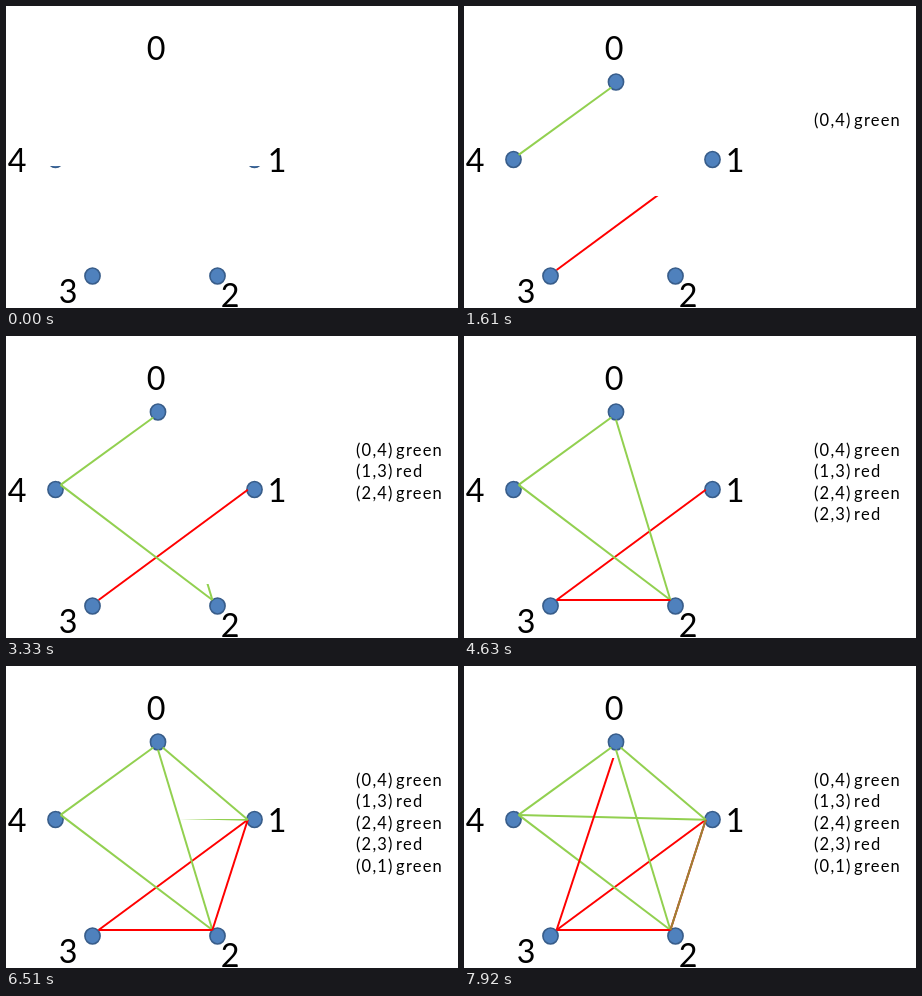
An HTML page for the animation above (8000 ms loop, 452 px wide and 302 px high).

```html
<!DOCTYPE html>
<html lang="en">
<head>
<meta charset="utf-8">
<title>Edge colouring of five points</title>
<style>
  html, body { margin: 0; width: 100%; height: 100%; overflow: hidden; background: #fff; }
  svg { position: absolute; left: 0; top: 0; width: 452px; height: 302px; }
  text { font-family: Lato, "Open Sans", sans-serif; fill: #000; }
  .label { font-size: 32.3px; text-anchor: middle; }
  .entry { font-size: 16.5px; letter-spacing: 1.2px; word-spacing: -3px; }
  line { stroke-width: 2; }
  ellipse { fill: #4f81bd; stroke: #385d8a; stroke-width: 1.6; }
</style>
</head>
<body>
<script>
const LOOP = 8000, HEIGHT = 302;
const FIRST = 213, GAP = 513.5;    // start of the first effect, time between effects
const WIPE = 540, STEPS = 7;       // length of a wipe, visible steps in it
const ROW = 21.6;
const COLOURS = { green: '#92d050', red: '#ff0000', olive: '#9a8436' };
const NS = 'http://www.w3.org/2000/svg';

// Centre, label and the point where edges attach; the top node attaches by direction
const nodes = [
  { at: [152, 76], label: [150, 54.3] },
  { at: [248.5, 153.5], label: [271, 166], port: [241.8, 153.8] },
  { at: [211.5, 270], label: [224, 301], port: [206.4, 264] },
  { at: [86.5, 270], label: [62, 297], port: [92.6, 264] },
  { at: [49.5, 153.5], label: [11, 166], port: [54.6, 148.9] }
];

// Edges in drawing order; listed ones are also written at the right
const edges = [
  [0, 4, 'green', 'listed'],
  [1, 3, 'red', 'listed'],
  [2, 4, 'green', 'listed'],
  [0, 2, 'green'],
  [2, 3, 'red', 'listed'],
  [1, 2, 'red'],
  [0, 1, 'green', 'listed'],
  [1, 4, 'green'],
  [1, 2, 'olive'],
  [0, 3, 'red']
];

function add(parent, tag, attrs, content = '') {
  const el = document.createElementNS(NS, tag);
  for (const key in attrs) el.setAttribute(key, attrs[key]);
  el.textContent = content;
  parent.appendChild(el);
  return el;
}

const layer = () => add(document.body, 'svg', { viewBox: '0 0 452 302' });
const wipes = [];

// Reveals a layer upwards, from y = bottom to y = top
function wipe(start, bottom, top) {
  const el = layer();
  wipes.push({ el, start, bottom, top });
  return el;
}

// The attaching point of a node, for an edge to another node
function port(from, to) {
  if (from.port) return from.port;
  const [x, y] = from.at;
  const eighth = Math.PI / 4;
  const angle = Math.round(Math.atan2(to.at[1] - y, to.at[0] - x) / eighth) * eighth;
  return [x + 6.6 * Math.cos(angle), y + 7.8 * Math.sin(angle)];
}

function addEdge(start, a, b, colour) {
  const [x1, y1] = port(nodes[a], nodes[b]);
  const [x2, y2] = port(nodes[b], nodes[a]);
  const svg = wipe(start, Math.max(y1, y2) + 1, Math.min(y1, y2) - 1);
  add(svg, 'line', { x1, y1, x2, y2, stroke: COLOURS[colour] });
}

function addEntry(start, row, words) {
  const y = 119.5 + row * ROW;
  add(wipe(start, y + 5.5, y - 24.5), 'text', { x: 350, y, class: 'entry' }, words);
}

const labels = layer();
const dots = wipe(-240, 261, 67);
nodes.forEach(({ at: [cx, cy], label: [x, y] }, i) => {
  add(labels, 'text', { x, y, class: 'label' }, i);
  add(dots, 'ellipse', { cx, cy, rx: 7.6, ry: 8 });
});

let slot = 0, row = 0;
const nextStart = () => FIRST + GAP * slot++;
for (const [a, b, colour, listed] of edges) {
  addEdge(nextStart(), a, b, colour);
  if (listed) addEntry(nextStart(), row++, `(${a},${b}) ${colour}`);
}

function draw() {
  const t = performance.now() % LOOP;
  for (const { el, start, bottom, top } of wipes) {
    const step = Math.floor((t - start) / WIPE * STEPS);
    const p = (step + 0.65) / STEPS;
    const y = step < 0 ? HEIGHT : step >= STEPS ? 0 : Math.round(bottom + (top - bottom) * p);
    el.style.clipPath = `inset(${y}px 0 0 0)`;
  }
  requestAnimationFrame(draw);
}
draw();
</script>
</body>
</html>
```
